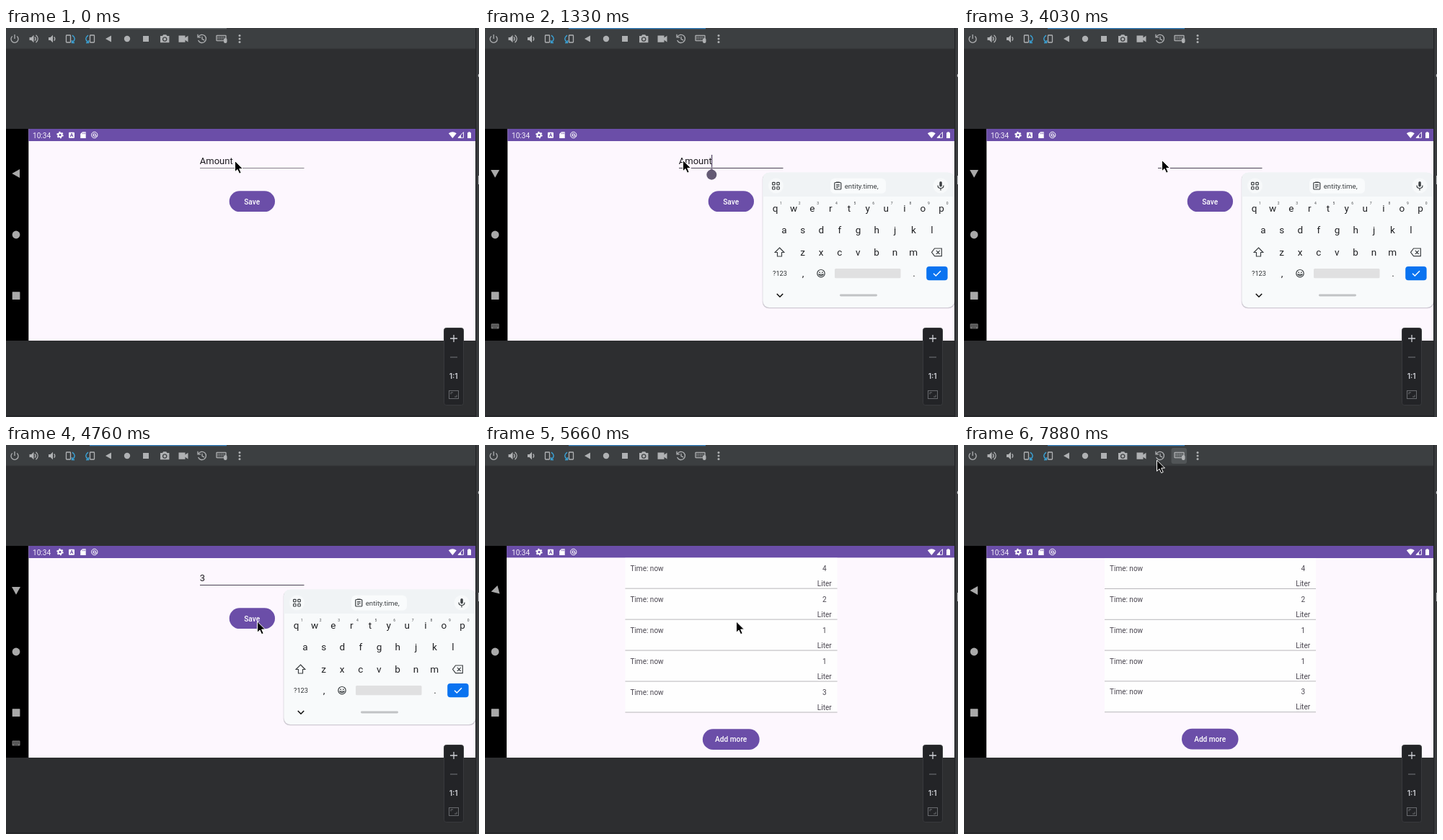
Write an HTML page that moves like this. It is 656 by 540 pixels and loops after 8000 ms.

```html
<!DOCTYPE html>
<html lang="en">
<head>
<meta charset="utf-8">
<title>Amount form</title>
<style>
html, body { margin: 0; width: 100%; height: 100%; overflow: hidden; background: #2d2e30; }
svg { display: block; }
text { font-family: Roboto, "Noto Sans", sans-serif; }
.mid { text-anchor: middle; }
.label { font-size: 10.1px; font-weight: 500; fill: #fff; text-anchor: middle; }
.line { fill: none; stroke: #afb1b3; stroke-width: 1.3; }
.blue { fill: none; stroke: #3a9fd2; stroke-width: 1.5; }
.key { font-size: 13.5px; fill: #202124; text-anchor: middle; }
.hint { font-size: 5px; fill: #44474a; text-anchor: middle; }
.ink { fill: none; stroke: #3c4043; stroke-width: 1.2; }
.row { font-size: 10px; fill: #49454f; }
</style>
</head>
<body>
<svg width="656" height="540" viewBox="0 0 656 540">
  <defs>
    <clipPath id="screen"><rect y="140" width="651" height="294"/></clipPath>
    <clipPath id="below"><rect y="156.5" width="651" height="277.5"/></clipPath>
  </defs>

  <!-- emulator window -->
  <rect width="656" height="540" fill="#2d2e30"/>
  <rect width="651" height="29" fill="#3c3f41"/>
  <rect y="28.5" width="651" height="1" fill="#323436"/>
  <rect x="651" width="1.2" height="540" fill="#222326"/>
  <rect x="652.2" width="4" height="540" fill="#393b3d"/>
  <rect y="538" width="652" height="1" fill="#222326"/>
  <circle cx="657" cy="66" r="2.3" fill="#c9cbcd"/>
  <rect x="655" y="205" width="1" height="12" fill="#c9cbcd"/>
  <rect id="tab" x="116" width="190" height="1.3" fill="#6d7276"/>
  <rect id="hover" x="287.500" y="4" width="21.500" height="22" rx="3" fill="#515557"/>

  <g id="tools" fill="#afb1b3">
    <path class="line" d="M8.800 11.500a5 5 0 1 0 6.400 0M12 9v6"/>
    <g id="speaker"><path d="M32.500 13v4h2.600l3.400 3.300V9.700L35.100 13z"/><path class="line" d="M40 12.300q2.200 2.700 0 5.400"/></g>
    <path class="line" d="M41.500 9.800q5.400 5.200 0 10.400"/>
    <path d="M59 13v4h2.600l3.400 3.300V9.700L61.600 13z"/><path class="line" d="M66.700 12.300q2.200 2.700 0 5.400"/>
    <rect class="line" x="83.500" y="10" width="6" height="10" rx=".8"/>
    <path class="blue" d="M92 10.200q6.500 4.800 0 9.800M91.500 17v3.500h3.500"/>
    <rect class="line" x="116.500" y="10" width="6" height="10" rx=".8"/>
    <path class="blue" d="M114 10.200q-6.500 4.800 0 9.800M114.500 17v3.500h-3.500"/>
    <path d="M138 15l8-4.500v9z"/>
    <circle cx="168" cy="15" r="4.200"/>
    <rect x="190" y="11" width="8" height="8"/>
    <path fill-rule="evenodd" d="M214 11h3l1.200-1.700h4L223.400 11h3v9.300H214zM220.200 12.200a3.300 3.300 0 1 0 .01 0z"/><circle cx="220.200" cy="15.500" r="1.900"/>
    <path d="M239.500 10.500h9v3l4-2.700v8.700l-4-2.700v3h-9z"/>
    <path class="line" d="M267 12a5.600 5.600 0 1 1-.4 5M266 8.800v4h4M272 11.700v3.600l3 1.600"/>
    <rect class="line" x="292" y="10.300" width="13" height="7.400" rx=".6"/>
    <path class="line" stroke-dasharray="1.300 1" d="M293.500 12.700h10M293.500 15.200h8"/>
    <rect x="302" y="14" width="4.500" height="7" rx="2"/>
    <circle cx="324" cy="10.400" r="1.500"/><circle cx="324" cy="15" r="1.500"/><circle cx="324" cy="19.600" r="1.500"/>
  </g>

  <!-- device -->
  <rect y="140" width="651" height="294" fill="#000"/>
  <g clip-path="url(#screen)">
    <g id="app">
      <rect x="31.300" y="140" width="625" height="300" fill="#fdf7fe"/>
      <rect x="31.300" y="139" width="625" height="18" fill="#6b4ea8"/>
    </g>
    <g id="form">
      <text id="field" x="268.800" y="189.300" font-size="13" fill="#1d1b20"></text>
      <rect id="rule" x="269" y="194" width="144.500" height="1"/>
      <rect id="caret" y="176" width="1.200" height="17.500" fill="#4f4360"/>
      <path id="handle" d="M314.300 195.300l4.700 3.200a7 7 0 1 1-9.400 0z" fill="#645a74"/>
      <rect x="309.700" y="226.300" width="63.300" height="28.800" rx="14.400" fill="#6b4ea8"/>
      <text class="label" x="341.200" y="244.600">Save</text>
    </g>
    <g id="list" clip-path="url(#below)">
      <g id="page">
        <rect x="31.300" y="157" width="625" height="280" fill="#fdf7fe"/>
        <rect x="195" y="157" width="293" height="213.500" fill="#fefefe"/>
        <g id="rows"></g>
        <rect x="302" y="393.800" width="78.500" height="28.700" rx="14.350" fill="#6b4ea8"/>
        <text class="label" x="341.200" y="412">Add more</text>
      </g>
    </g>
    <g fill="#fff">
      <text x="37" y="152.500" font-size="10.100" fill="#f6f1fb">10:34</text>
      <circle cx="75" cy="148.500" r="2.600" fill="none" stroke="#fff" stroke-width="2"/>
      <circle cx="75" cy="148.500" r="4" fill="none" stroke="#fff" stroke-width="1.500" stroke-dasharray="2 2.190"/>
      <rect x="87" y="144.800" width="8" height="8" rx="1"/>
      <text class="mid" x="91" y="151.300" font-size="7" font-weight="700" style="fill:#6b4ea8">A</text>
      <path d="M106 144.300h4.700v8.700h-7.500v-6z"/><path d="M106.300 145.500v1.700M108 145.500v1.700M109.600 145.500v1.700" stroke="#6b4ea8" stroke-width=".8"/>
      <circle cx="122.700" cy="148.500" r="4.200" fill="none" stroke="#fff"/>
      <path d="M121 150.500v-3.500h3.200v3h2M121 149l3 2" fill="none" stroke="#fff"/>
      <path d="M613.800 146.300q5.500-4.300 11 0l-5.500 6.700z"/>
      <path d="M627 152.300l7.500-7.600v7.600z" fill="none" stroke="#fff" stroke-width=".9"/><path d="M627 152.500l4-4v4z"/>
      <path d="M640 145.300h1.300v-1h2.400v1h1.300v7.700h-5z"/>
    </g>

    <g id="keyboard">
      <rect x="384.700" y="201" width="267" height="188.300" rx="9" fill="#cfcbd3"/>
      <rect x="385.300" y="200.500" width="265.700" height="187.500" rx="9" fill="#f8fafb"/>
      <path d="M385.300 234v-24.500a9 9 0 0 1 9-9h247.700a9 9 0 0 1 9 9V234z" fill="#f0f3f5"/>
      <circle cx="403.500" cy="219" r="10.500" fill="#f7f9fa"/><circle cx="632" cy="219" r="10.500" fill="#f7f9fa"/>
      <rect x="479" y="208.800" width="77" height="21" rx="6" fill="#f9fbfc"/>
      <g class="ink">
        <rect x="398.600" y="214.300" width="3.500" height="3.500" rx=".8"/><rect x="404.800" y="214.300" width="3.500" height="3.500" rx=".8"/>
        <rect x="398.600" y="220.500" width="3.500" height="3.500" rx=".8"/><rect x="404.800" y="220.500" width="3.500" height="3.500" rx=".8"/>
        <rect x="484.800" y="214.500" width="9" height="9.500" rx="1"/><path d="M487 214h4.700M487 217.500h4.700M487 219.500h4.700M487 221.500h3"/>
        <path d="M628 218.500q0 4 4 4t4-4M632 222.500v3"/>
        <path d="M408.500 305l6.300 6.500h-3.300v5.500h-6v-5.500h-3.300z"/>
        <path d="M619.500 311.300l4-5.300h9.800v10.600h-9.800zM625.800 308.800l5 5M630.800 308.800l-5 5"/>
        <circle cx="466" cy="340.700" r="5.200"/><path d="M463 342q3 3.500 6 0z"/>
        <path d="M404.800 369l4.200 4.200 4.200-4.200" stroke="#111" stroke-width="1.600"/>
      </g>
      <rect x="630.300" y="213" width="3.500" height="7.500" rx="1.750" fill="#3c4043"/>
      <circle cx="464.200" cy="339.300" r=".8"/><circle cx="467.800" cy="339.300" r=".8"/>
      <text x="498.700" y="222.500" font-size="9.700" fill="#3c4043">entity.time,</text>
      <g id="keys"></g>
      <text class="mid" x="409" y="344" font-size="9.200" fill="#303336">?123</text>
      <rect x="485" y="334" width="91.500" height="13.300" rx="1.500" fill="#e0e0e1"/>
      <rect x="612.200" y="331" width="29.400" height="19.300" rx="4" fill="#0a73f0"/>
      <path d="M622 340.700l3.300 3.300 6.700-6.700" fill="none" stroke="#fff" stroke-width="1.400"/>
      <rect x="492" y="369.600" width="52" height="2.800" rx="1.400" fill="#c1c3c5"/>
    </g>
  </g>

  <!-- navigation bar -->
  <g fill="#a9a9a9">
    <path id="back" d="M8.300 202l10.700-6v12z"/>
    <circle cx="14" cy="287" r="5.400"/>
    <rect x="8.700" y="366.300" width="10.700" height="10.700" rx=".5"/>
    <g id="switcher"><rect x="8.500" y="410.500" width="11" height="7" rx="1" fill="#777"/>
      <path d="M9.700 412.500h9M9.700 414.300h9M11.500 416.200h5" stroke="#000" stroke-dasharray="1 .9" stroke-width=".9"/></g>
  </g>

  <!-- zoom panel -->
  <rect x="607.500" y="416.500" width="27" height="107" rx="3" fill="#232427" stroke="#393a3d"/>
  <path d="M616 431h10M621 426v10" stroke="#ced0d6" stroke-width="1.300"/>
  <path d="M616 457h10" stroke="#636569" stroke-width="1.300"/>
  <text class="mid" x="620.700" y="486.700" font-size="10.300" font-weight="600" style="font-family:Inter,Roboto,sans-serif" fill="#ced0d6">1:1</text>
  <g fill="none" stroke="#696b6f"><rect x="614.500" y="503.500" width="13" height="11"/><path d="M617 508.500v-2.500h3M625 509.500v2.500h-3"/></g>

  <path id="cursor" d="M0 0V15.300L3.500 12 6.100 17.700 8.700 16.600 6.200 11H11z" fill="#000" stroke="#fff" stroke-width="1" stroke-linejoin="round"/>
</svg>
<script>
const $ = id => document.getElementById(id);
const LOOP = 8000;

function addText(parent, cls, x, y, str) {
  const el = document.createElementNS("http://www.w3.org/2000/svg", "text");
  el.setAttribute("class", cls);
  el.setAttribute("x", x);
  el.setAttribute("y", y);
  el.textContent = str;
  parent.append(el);
}

// keyboard letters
[["qwertyuiop", 402.500, 254.700], ["asdfghjkl", 415, 285], ["zxcvbnm", 440.500, 315.500]].forEach(([keys, x, y], row) => {
  [...keys].forEach((k, i) => {
    addText($("keys"), "key", x + i * 25.620, y, k);
    if (!row) addText($("keys"), "hint", x + 8 + i * 25.620, 244.500, (i + 1) % 10);
  });
});
addText($("keys"), "key", 441, 345, ",");
addText($("keys"), "key", 595, 345, ".");

// list rows
[4, 2, 1, 1, 3].forEach((n, i) => {
  const y = 157 + i * 42.800;
  addText($("rows"), "row", 202, y + 18.200, "Time: now");
  addText($("rows"), "row mid", 470.200, y + 18.200, n);
  addText($("rows"), "row mid", 470.200, y + 39.200, "Liter");
  $("rows").insertAdjacentHTML("beforeend", `<rect x="195" y="${y + 42}" width="293" height="1" fill="#b9b7bb"/>`);
});

// Each track holds its value until the next time.
const tracks = {
  cursor: [[0, [317.500, 184.500]], [150, [309, 185]], [300, [292, 184]], [450, [278, 183.500]], [600, [274.500, 183.500]],
    [4320, [286, 195]], [4470, [325, 225]], [4610, [346, 243]], [4760, [348.500, 245]],
    [6250, [349, 290]], [6400, [349, 362]], [6550, [348.500, 393]],
    [6850, [347.500, 399]], [7000, [346, 406]], [7140, [345.500, 408.500]],
    [7590, [325, 260]], [7740, [293, 60]], [7880, [267.500, 21]]],
  field: [[0, ["Amount", 314]], [1930, ["Amoun", 310]], [2080, ["Amo", 297]], [2230, ["Am", 289]],
    [2530, ["A", 278]], [2680, ["", 269]], [4180, ["3", 276]]],
  caret: [[0, 0], [740, 1], [1180, 0], [1330, 1], [3130, 0], [3580, 1], [4030, 0], [4180, 1], [4760, 0], [5210, 1]],
  handle: [[0, 0], [740, 1], [1930, 0]],
  focus: [[0, 0], [740, 1]],
  keyboard: [[0, 0], [880, .4], [1030, .85], [1180, 1], [5510, .4], [5660, 0]],
  switcher: [[0, 0], [1030, 1], [5510, 0]],
  back: [[0, 0], [880, -45], [1030, -90], [5510, -60], [5660, -15], [5800, 0]],
  list: [[0, 0], [5510, .6], [5660, 1]],
  scale: [[0, 1], [5510, 1.015], [5660, 1.004], [5800, 1]],
  hover: [[0, 0], [7740, 1]]
};
const at = (name, t) => tracks[name].findLast(k => k[0] <= t)[1];
const fade = (id, v) => $(id).setAttribute("opacity", v);

function draw(t) {
  const [str, caretX] = at("field", t);
  $("field").textContent = str;
  $("caret").setAttribute("x", caretX);
  $("rule").setAttribute("fill", at("focus", t) ? "#4a4453" : "#87838b");
  $("tab").setAttribute("fill", t < 150 ? "#6d7276" : "#3a86c4");
  ["caret", "handle", "keyboard", "switcher", "list", "hover"].forEach(id => fade(id, at(id, t)));
  fade("form", t < 5660 ? 1 : 0);
  $("back").setAttribute("transform", `rotate(${at("back", t)} 14 202)`);
  const zoom = `translate(341 287) scale(${at("scale", t)}) translate(-341 -287)`;
  $("app").setAttribute("transform", zoom);
  $("page").setAttribute("transform", zoom);
  $("cursor").setAttribute("transform", `translate(${at("cursor", t)})`);
}

const start = performance.now();
function tick() {
  draw((performance.now() - start) % LOOP);
  requestAnimationFrame(tick);
}
tick();
</script>
</body>
</html>
```
